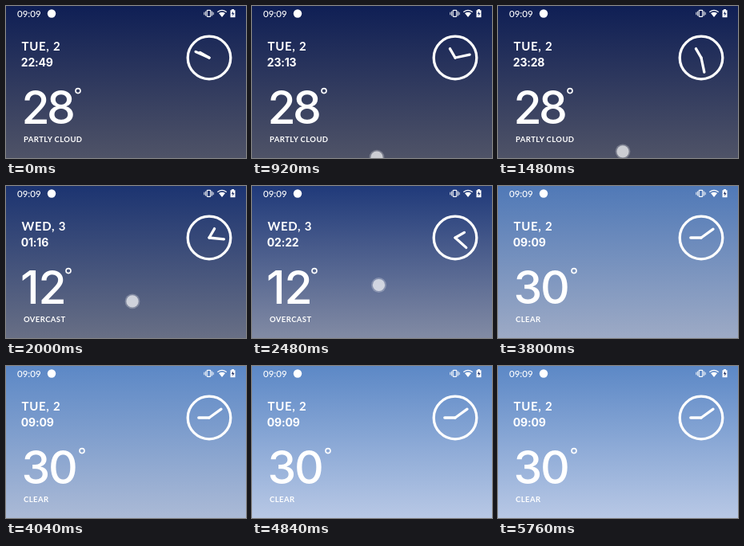
Recreate the animation shown at these times as an HTML page. Size 300 by 191 pixels, loop 6000 ms.

```html
<!DOCTYPE html>
<html lang="en">
<head>
<meta charset="utf-8">
<title>Weather clock</title>
<style>
  html, body { margin: 0; width: 100%; height: 100%; overflow: hidden; background: #0f1f55; }
  svg { display: block; width: 100vw; height: 100vh; }
  text { fill: #fff; font-family: Lato, sans-serif; font-weight: 700; white-space: pre; }
  #date { font-size: 15px; letter-spacing: .7px; }
  #time { font: 700 14px Inter, sans-serif; letter-spacing: -.2px; }
  #label { font-size: 9.5px; letter-spacing: .4px; }
  #temp { font: 500 57px Inter, sans-serif; }
  #status { font-size: 11.5px; font-weight: 500; }
  .line { fill: none; stroke: #fff; stroke-linecap: round; }
</style>
</head>
<body>
<svg viewBox="0 0 300 191" preserveAspectRatio="none">
  <defs>
    <linearGradient id="sky" x2="0" y2="1">
      <stop id="skyTop"/>
      <stop id="skyBottom" offset="1"/>
    </linearGradient>
  </defs>
  <rect width="300" height="191" fill="url(#sky)"/>

  <text id="status" x="14" y="13.5">09:09</text>
  <g fill="#fff">
    <circle cx="57" cy="9.5" r="5.2"/>
    <path d="M266 8.9Q270 6.4 274 8.9L270 14Z"/>
    <path d="M282 4h3v1.2h1.5v9h-6v-9h1.5Z"/>
  </g>
  <path d="M284 6.5l-2.2 3.6h1.5v2.6l2.2-3.8H284Z" fill="#26376c"/>
  <g class="line">
    <path d="M264.8 7.3Q270 3.5 275.2 7.3" stroke-width="1.3"/>
    <rect x="251.2" y="5.4" width="4.6" height="8" rx=".8" stroke-width="1.2"/>
    <path d="M249.4 7v5M257.6 7v5M247.8 8.2v2.6M259.2 8.2v2.6" stroke-width=".9"/>
  </g>

  <text id="date" x="19.5" y="55.8"></text>
  <text id="time" x="18.8" y="76.2"></text>
  <text id="temp" y="147.5"></text>
  <circle id="degree" class="line" cy="106.6" r="3" stroke-width="1.6"/>
  <text id="label" x="22" y="171.3"></text>

  <g class="line" transform="translate(254 65)" stroke-width="3.3">
    <circle r="26.8"/>
    <path id="hourHand" d="M0 0V-13.2"/>
    <path id="minuteHand" d="M0 0V-18.5"/>
  </g>

  <g id="touch" fill="#fff">
    <circle r="9.4" opacity=".25"/>
    <circle r="7.6" opacity=".62"/>
  </g>
</svg>
<script>
const LOOP = 6000, DAY = 1440;
const MIDNIGHT = 1540, RELEASE = 3320;
const TEMP_MS = 350, TOP_MS = 600, BOTTOM_MS = 950;

const night = { date: 'TUE, 2', temp: 28, label: 'PARTLY CLOUD', top: [15, 31, 85], bottom: [79, 83, 103] };
const overcast = { date: 'WED, 3', temp: 12, label: 'OVERCAST', top: [32, 58, 122], bottom: [130, 140, 165] };
const clear = { date: 'TUE, 2', temp: 30, label: 'CLEAR', top: [92, 136, 198], bottom: [184, 200, 229] };

// Each drag point: time in ms, minutes since midnight, finger x and y.
const drag = [
  [0, 1369, 156, 202],
  [1480, 1407, 156, 183],
  [MIDNIGHT, DAY, 156.5, 172],
  [2000, 1516, 158, 145],
  [2480, 1582, 158.5, 124.5],
  [RELEASE, 1600, 158.5, 120]
];

const $ = id => document.getElementById(id);
const clamp = v => Math.min(1, Math.max(0, v));
const mix = (a, b, p) => a + (b - a) * p;
const mixColor = (a, b, p) => `rgb(${a.map((v, i) => Math.round(mix(v, b[i], p)))})`;
const pad = n => String(n).padStart(2, '0');

function dragAt(t) {
  let i = 0;
  while (i < drag.length - 2 && t >= drag[i + 1][0]) i++;
  const [from, to] = [drag[i], drag[i + 1]];
  const p = clamp((t - from[0]) / (to[0] - from[0]));
  return from.map((v, k) => mix(v, to[k], p));
}

function showTemperature(value) {
  const digits = String(Math.round(value));
  const narrow = digits[0] === '1', round = digits[1] === '0';
  $('temp').textContent = digits;
  $('temp').setAttribute('x', narrow ? '18 40.5' : `19.5 ${round ? 53 : 51}`);
  $('degree').setAttribute('cx', narrow ? 78 : round ? 95 : 90);
}

function draw(t) {
  const released = t >= RELEASE;
  const [, minutes, x, y] = dragAt(t);
  const now = released ? 9 * 60 + 9 : Math.round(minutes) % DAY;
  const hour = Math.floor(now / 60), minute = now % 60;

  const [from, to, start] = released ? [overcast, clear, RELEASE]
    : t >= MIDNIGHT ? [night, overcast, MIDNIGHT] : [night, night, 0];
  const progress = duration => clamp((t - start) / duration);

  $('date').textContent = to.date;
  $('time').textContent = `${pad(hour)}:${pad(minute)}`;
  $('label').textContent = to.label;
  showTemperature(mix(from.temp, to.temp, progress(TEMP_MS)));
  $('skyTop').setAttribute('stop-color', mixColor(from.top, to.top, progress(TOP_MS)));
  $('skyBottom').setAttribute('stop-color', mixColor(from.bottom, to.bottom, progress(BOTTOM_MS)));

  $('hourHand').setAttribute('transform', `rotate(${hour * 30})`);
  $('minuteHand').setAttribute('transform', `rotate(${minute * 6})`);
  $('touch').setAttribute('transform', `translate(${x} ${y})`);
  $('touch').setAttribute('opacity', clamp((RELEASE - t) / 140));
}

function frame() {
  draw(performance.now() % LOOP);
  requestAnimationFrame(frame);
}
frame();
</script>
</body>
</html>
```
